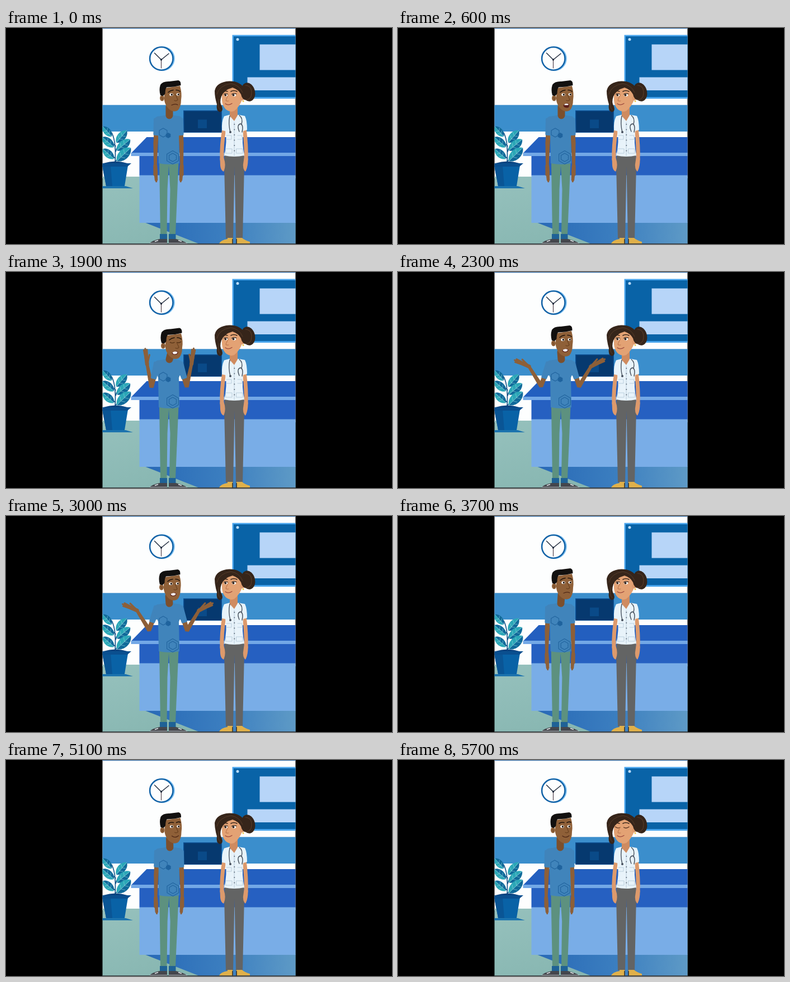
Animation, 690 px wide and 388 px high, one loop 5.8 s. Source, as an HTML page:

```html
<!DOCTYPE html>
<html lang="en">
<head>
<meta charset="utf-8">
<title>At the reception desk</title>
<style>
html, body { margin: 0; width: 100%; height: 100%; overflow: hidden; background: #000; }
svg { display: block; width: 690px; height: 388px; }
.line { fill: none; stroke-linecap: round; stroke-linejoin: round; }
.limb { stroke-width: 4; stroke-linejoin: round; }
</style>
</head>
<body>
<svg viewBox="0 0 690 388">
<defs>
  <clipPath id="room"><rect x="172.500" width="345" height="388"/></clipPath>
  <linearGradient id="floor" x1="0" y1="0" x2="1" y2="1">
    <stop offset="0" stop-color="#96c1bd"/><stop offset="1" stop-color="#80b1ab"/>
  </linearGradient>
  <linearGradient id="shade">
    <stop offset="0" stop-color="#2869b6"/><stop offset=".55" stop-color="#3c7fc0"/><stop offset="1" stop-color="#5e9ac6"/>
  </linearGradient>
</defs>
<g clip-path="url(#room)">
  <!-- wall -->
  <rect x="172" width="346" height="270" fill="#fdfefe"/>
  <rect x="172" width="346" height="1.3" fill="#3d70a6"/>
  <rect x="172" y="138.300" width="346" height="47.700" fill="#3b8ecc"/>
  <rect x="404.500" y="12.500" width="120" height="114.500" fill="#48a4ec"/>
  <rect x="407" y="15" width="115" height="109" fill="#0963a7"/>
  <circle cx="414" cy="20.500" r="2.500" fill="#b9dcfa"/>
  <rect x="453.500" y="29.500" width="66" height="46" fill="#b7d5f8"/>
  <rect x="431.500" y="88.500" width="88" height="23.500" fill="#b7d5f8"/>

  <!-- clock -->
  <circle cx="279.500" cy="55" r="22.300" fill="#7cc0f2"/>
  <circle cx="277.800" cy="55" r="20.700" fill="#fdfefe" stroke="#1363a7" stroke-width="2.600"/>
  <path class="line" d="M277.500 57L265.500 45M277.500 57L291 46" stroke="#1b2638" stroke-width="1.400"/>
  <path class="line" d="M277.500 57V72" stroke="#473540" stroke-width="1.100"/>
  <circle cx="277.500" cy="57" r="1.700" fill="#1b2638"/>

  <!-- floor, desk and monitor -->
  <rect x="172" y="267" width="346" height="121" fill="url(#floor)"/>
  <path d="M247 349H518V388H346Z" fill="url(#shade)"/>
  <rect x="317" y="148" width="69" height="40" fill="#0d4f92"/>
  <rect x="318.500" y="149.500" width="66" height="37.500" fill="#06396f"/>
  <rect x="343" y="164.500" width="16" height="15.500" fill="#0a4a88"/>
  <path d="M251.500 196H518V225H223.500Z" fill="#235fbf"/>
  <rect x="238.500" y="229" width="280" height="36" fill="#2660c1"/>
  <rect x="223.500" y="224" width="295" height="6" fill="#73a8e6"/>
  <rect x="238.500" y="264.500" width="280" height="85.500" fill="#79ade7"/>

  <!-- plant -->
  <path d="M172 284H214L227 288H172Z" fill="#1c73ae"/>
  <path class="line" d="M195 244C196 222 196 202 189 188M196 222Q199 212 204 206M195 240Q201 234 206 230M195 234L187 226M196 212L188 205" stroke="#0d4f85" stroke-width="1.600"/>
  <g id="leaves"></g>
  <path d="M174 243Q196 236 217 243Z" fill="#0a4380"/>
  <path d="M172 247H218L212 284H179Z" fill="#0962a6"/>
  <path d="M172 247H187L190 284H179Z" fill="#0a5595"/>
  <path d="M172 243H224L217 249H172Z" fill="#0a4f8f"/>

  <!-- nurse -->
  <path d="M391 227H425L426 245L423 378H411L408.500 249L406 378H393L390 245Z" fill="#636464"/>
  <path d="M396 377H405L406 387H381Q384 381 396 379ZM412 377H422Q426 381 436 384V387H412Z" fill="#e0b04a"/>
  <path d="M405 379V387M412 379V387" stroke="#2b2a2a" stroke-width="1.500"/>
  <g class="line" stroke="#dd9a6c" stroke-width="7">
    <path d="M390 180Q385 212 386 236"/><path d="M426 180Q430 212 429 236"/>
  </g>
  <path d="M382.500 234H389.500Q394 247 389 258Q384 256 383 247ZM425.500 234H432.500Q433 249 428 258Q423 254 424 244Z" fill="#dd9a6c"/>
  <path d="M399 156L390 158.500Q385 168 386 184L392 185Q396 203 390 229Q408 233 426 229Q421 204 424 185L431 183Q431 166 427 158L416 156Z" fill="#e8f3fa"/>
  <path d="M400 142H414V157L408 167L400 158Z" fill="#cf8b60"/>
  <path class="line" d="M408 169V230M394 193H403V200H394M414 193H422V200H414M393 217H404V225H393ZM412 217H423V225H412Z" stroke="#b5cad8" stroke-width=".9"/>
  <path d="M408.300 173V229" class="line" stroke="#5c6875" stroke-width="2" stroke-dasharray=".1 9.400"/>
  <path class="line" d="M400 158Q397 172 401 187M417 157Q424 162 421 173M417 186Q412 174 419 172Q425 174 422 187" stroke="#46505c" stroke-width="1.400"/>
  <circle cx="401" cy="187" r="2" fill="#46505c"/>
  <ellipse cx="433" cy="115" rx="12" ry="17" transform="rotate(-14 433 115)" fill="#36251a"/>
  <path class="line" d="M428 103Q442 104 438 123Q433 131 426 128" stroke="#573c29" stroke-width="1.200"/>
  <path d="M386 112Q397 101 420 108L423 127Q417 142 408 149Q401 152 394 147Q387 141 386 130Z" fill="#e3a274"/>
  <circle cx="422" cy="126" r="4" fill="#dd9a6c"/>
  <circle cx="424" cy="131.500" r="1.500" fill="#f1c64e"/>
  <path d="M373 113Q376 97 399 95.500Q420 95 427 111L429 129Q422 129 420 119Q415 110 405 107Q390 111 385 123Q381 134 386 141Q389 150 382 151Q375 149 377 137Q373 124 373 113Z" fill="#36251a"/>
  <path class="line" d="M377 119Q381 103 402 100Q417 102 423 116M381 128Q377 142 383 147" stroke="#573c29" stroke-width="1"/>
  <path class="line" d="M388 115Q391 112 396 114M402 114Q407 111 413 114" stroke="#36251a" stroke-width="1.500"/>
  <g id="nurseOpen">
    <ellipse cx="393" cy="120.500" rx="3" ry="2.200" fill="#fff"/><ellipse cx="407.500" cy="120.500" rx="3.500" ry="2.400" fill="#fff"/>
    <circle cx="392.300" cy="120.500" r="1.900" fill="#35241c"/><circle cx="406.500" cy="120.500" r="2" fill="#35241c"/>
    <path class="line" d="M389.500 119Q393 116.500 396.500 119M403.500 119Q408 116.500 412 118.500" stroke="#35241c" stroke-width="1.100"/>
  </g>
  <path id="nurseShut" class="line" d="M388.500 120Q393 123.500 397 121M403.500 121Q408 124 413 120" stroke="#573322" stroke-width="1.300"/>
  <path class="line" d="M397 121Q394 127 393 130Q395 132 398 131" stroke="#bd784f" stroke-width="1.100"/>
  <path class="line" d="M392 136Q397 140 404 135.500" stroke="#9c4a3e" stroke-width="1.300"/>

  <!-- visitor -->
  <path id="legs" fill="#5d917f"/>
  <path d="M275 370H288V380H275ZM291 370H303.500V380H291Z" fill="#1f6296"/>
  <path d="M274 379H288V387H257Q260 382 274 379ZM291 379H304Q317 382 324 387H291Z" fill="#45474d"/>
  <path d="M257 387H288M291 387H324M266 383.500L272 381.500M308 381.500L314 383.500" stroke="#e9ecee" stroke-width="1.500"/>
  <g id="arms"></g>
  <path id="shirt" fill="#4084bb"/>
  <path id="neck" class="line" stroke="#7c4f2c" stroke-width="13"/>
  <g id="prints">
    <g class="line" stroke="#22659f" stroke-width="1.200">
      <path id="hexA"/><path id="hexB"/><path id="hexC"/>
    </g>
    <path id="hexD" fill="#1f639e"/>
  </g>
  <g id="head">
    <path d="M283 108L311 104Q315 118 313 129Q313 142 307 148Q300 152 293 147Q285 141 283 130Z" fill="#8f6038"/>
    <ellipse cx="279" cy="126" rx="4" ry="5.300" fill="#8f6038"/>
    <path class="line" d="M277.500 124Q280 125 279.500 128.500" stroke="#6b4220" stroke-width="1"/>
    <path d="M276 121Q273 111 276 102Q280 95.500 292 96L308 94Q313 95 312.500 103Q301 106 287 106.500Q284.500 110 284.500 118L281 122Z" fill="#12100f"/>
    <g id="eyes">
      <ellipse cx="295.500" cy="119.700" rx="3.200" ry="2.400" fill="#fff"/><ellipse cx="307.500" cy="119.300" rx="2.800" ry="2.300" fill="#fff"/>
      <circle cx="296.300" cy="119.700" r="1.700" fill="#20150f"/><circle cx="308.200" cy="119.300" r="1.600" fill="#20150f"/>
    </g>
    <path id="lids" class="line" d="M291.500 120Q295 122 299 120M304 120Q307 121.500 310.500 119" stroke="#49290f" stroke-width="1.200"/>
    <path id="brows" class="line" stroke="#22150c" stroke-width="1.600"/>
    <path class="line" d="M303 120Q306 126 307 129Q304 132 301 130" stroke="#6b4220" stroke-width="1.200"/>
    <path id="lips" class="line" stroke="#4e2716" stroke-width="1.300"/>
    <path id="mouth" fill="#5a1d1a"/>
    <path id="teeth" fill="#fff"/>
  </g>
</g>
<rect x="172" y="387" width="346" height="1" fill="#2d3338"/>
</svg>

<script>
const LOOP = 5800, STEP = 100, RAD = Math.PI / 180;
const SKIN = '#8d5f38', SHIRT = '#4084bb';
const $ = id => document.getElementById(id);
const put = (el, d) => el.setAttribute('d', d);
const show = (el, on) => el.setAttribute('visibility', on ? 'visible' : 'hidden');

function add(parent, tag, attrs) {
  const el = document.createElementNS('http://www.w3.org/2000/svg', tag);
  for (const k in attrs) el.setAttribute(k, attrs[k]);
  return parent.appendChild(el);
}

function leaf(x, y, tx, ty) {
  const dx = tx - x, dy = ty - y;
  const at = (along, side) => `${x + dx * along - dy * side} ${y + dy * along + dx * side}`;
  const half = (s, fill) => add($('leaves'), 'path',
    { d: `M${x} ${y}C${at(.2, s)} ${at(.8, s)} ${tx} ${ty}Z`, fill });
  half(.34, '#106a9a');
  half(-.34, '#2ba7b7');
  let veins = `M${x} ${y}L${tx} ${ty}`;
  for (const k of [.3, .55]) veins += `M${at(k + .12, .18)}L${at(k, 0)}L${at(k + .12, -.18)}`;
  add($('leaves'), 'path', { d: veins, class: 'line', stroke: '#8fd3dc', 'stroke-width': .6 });
}
[[189, 195, 173, 177], [197, 206, 216, 184], [193, 214, 172, 196],
 [198, 220, 222, 200], [193, 235, 173, 217], [198, 239, 223, 215]].forEach(p => leaf(...p));

// Arm poses: upper, fore and hand angles (0 = down, positive = right), then finger spread
const L = { rest: [-4, -1, 4, 0], scratch: [-109, -242, -232, .1], up: [-14, -169, -173, .45], open: [-20, -148, -114, .5] };
const R = { rest: [4, 1, -4, 0], up: [17, 168, 172, .45], open: [18, 149, 118, .5] };

// time, shoulder shift, head x, head y, left arm, right arm
const KEYS = [
  [0, 0, 0, 0, L.rest, R.rest],
  [700, 0, 0, 0, L.rest, R.rest],
  [1200, 7, 10, 8, L.scratch, R.rest],
  [1450, 7, 10, 8, L.scratch, R.rest],
  [1850, 0, 2, 6.5, L.up, R.up],
  [1950, 0, 2, 6.5, L.up, R.up],
  [2300, 0, -1, 2, L.open, R.open],
  [3100, 0, -1, 2, L.open, R.open],
  [3550, -1, 0, 0, L.rest, R.rest],
  [3700, -1, 0, 0, L.rest, R.rest],
  [4600, 3, 2.5, 0, L.rest, R.rest],
  [5700, -2, -2, 0, L.rest, R.rest],
  [LOOP, 0, 0, 0, L.rest, R.rest]
];

const mix = (a, b, k) => Array.isArray(a) ? a.map((v, i) => mix(v, b[i], k)) : a + (b - a) * k;

function poseAt(t) {
  const i = KEYS.findIndex(key => key[0] > t);
  const a = KEYS[i - 1], b = KEYS[i], k = (t - a[0]) / (b[0] - a[0]);
  return mix(a, b, k * k * (3 - 2 * k));
}

// Tapered limb outline; its rounded stroke adds 2px on every side
function taper([x, y], [u, v], w1, w2) {
  const len = Math.hypot(u - x, v - y), nx = (y - v) / len, ny = (u - x) / len;
  const a = w1 / 2 - 2, b = w2 / 2 - 2;
  return `M${x + nx * a} ${y + ny * a}L${u + nx * b} ${v + ny * b}L${u - nx * b} ${v - ny * b}L${x - nx * a} ${y - ny * a}Z`;
}

function makeArm(side) {
  const limb = color => add($('arms'), 'path', { class: 'limb', fill: color, stroke: color });
  const upper = limb(SKIN), fore = limb(SKIN);
  const hand = add($('arms'), 'g', { class: 'line', stroke: SKIN });
  const palm = add(hand, 'path', { d: 'M0 0L0 11', 'stroke-width': 7 });
  const fingers = add(hand, 'path', { 'stroke-width': 3 });
  const sleeve = limb(SHIRT);
  return (x, y, [a, b, c, spread]) => {
    const from = ([px, py], angle, len) => [px + Math.sin(angle * RAD) * len, py + Math.cos(angle * RAD) * len];
    const top = [x, y], elbow = from(top, a, 43), wrist = from(elbow, b, 41);
    put(upper, taper(top, elbow, 10, 8));
    put(fore, taper(elbow, wrist, 8, 5.5));
    put(sleeve, taper(top, from(top, a, 27), 13, 10.5));
    let d = '';
    for (const k of [-1, 0, 1]) d += `M${k * 1.8} 10L${k * (1.2 + 3.4 * spread)} ${28 - Math.abs(k) * 2.5}`;
    put(fingers, d + `M${side * 2} 4L${side * (3 + 7 * spread)} 16`);
    hand.setAttribute('transform', `translate(${wrist}) rotate(${-c})`);
  };
}
const leftArm = makeArm(-1), rightArm = makeArm(1);

function hex(id, x, y, r) {
  let d = '';
  for (let i = 0; i < 6; i++) {
    const a = (i * 60 + 30) * RAD;
    d += `${i ? 'L' : 'M'}${x + r * Math.cos(a)} ${y + r * Math.sin(a)}`;
  }
  put($(id), d + 'Z');
}
hex('hexA', 281, 188, 8);
hex('hexB', 298, 232.5, 12);
hex('hexC', 298, 232.5, 7.5);
hex('hexD', 290, 193, 5);

function drawBody(s) {
  const h = s * .3;
  put($('legs'), `M${274 + h} 240H${308.5 + h}L303 371H292L${293.5 + h * .5} 290L${291 + h} 247L${288.5 + h * .5} 290L287.5 371H276Z`);
  put($('shirt'), `M${284 + s} 157L${270 + s} 159Q${265 + s} 161 ${264.5 + s} 171L${272 + s * .7} 190L${273 + h} 243Q292 247 ${310 + h} 243L${309 + s * .7} 190L${316 + s} 171Q${315 + s} 160 ${311 + s} 158.5L${300 + s} 157Z`);
  $('prints').setAttribute('transform', `translate(${s * .45} 0)`);
}

const TALK = 'octcoto';
function mouthAt(t) {
  if (t < 600) return 'sad';
  if (t < 3200) return TALK[t / STEP % TALK.length];
  return t < 4000 ? 'sad' : 'smile';
}
const LIPS = {
  sad: 'M296 138.500Q302 135.500 307 138', c: 'M296 138Q301 137 306 138',
  smile: 'M296 136.500Q302 141 308 136'
};
const OPEN = {
  o: ['M295.500 139Q300 133 306 136.500Q307 143 302 143.500Q296 143 295.500 139Z', 'M297.500 137Q301 134.500 305 137L304 138.500H297.500Z'],
  t: ['M294.500 138.500Q300 134 305.500 137Q305.500 142 300 142Q295 142 294.500 138.500Z', 'M295.500 138Q300 135 304.500 137.500Q304 141 299 141Q296 140.500 295.500 138Z']
};

function drawFace(t) {
  const m = mouthAt(t), open = OPEN[m];
  show($('lips'), !open);
  show($('mouth'), open);
  show($('teeth'), open);
  if (open) {
    put($('mouth'), open[0]);
    put($('teeth'), open[1]);
  } else put($('lips'), LIPS[m]);
  const shut = (t >= 1800 && t < 2000) || t === 4200;
  show($('eyes'), !shut);
  show($('lids'), shut);
  put($('brows'), t < 4000 ? 'M290 115.500Q294 112 299 111.500M304 111.500Q308 111 311 114'
                           : 'M290 114Q294 111 299 112.500M304 112.500Q308 110 311 112');
}

function draw(t) {
  const [, shift, hx, hy, left, right] = poseAt(t);
  drawBody(shift);
  leftArm(270.5 + shift, 164, left);
  rightArm(310.5 + shift, 164, right);
  put($('neck'), `M${292 + hx} ${142 + hy}L${292 + shift} 157`);
  $('head').setAttribute('transform', `translate(${hx} ${hy})`);
  drawFace(t);
  const blink = t >= 5600;
  show($('nurseOpen'), !blink);
  show($('nurseShut'), blink);
}

const start = performance.now();
function tick() {
  const t = (performance.now() - start) % LOOP;
  draw(Math.floor(t / STEP) * STEP);
  requestAnimationFrame(tick);
}
tick();
</script>
</body>
</html>
```
